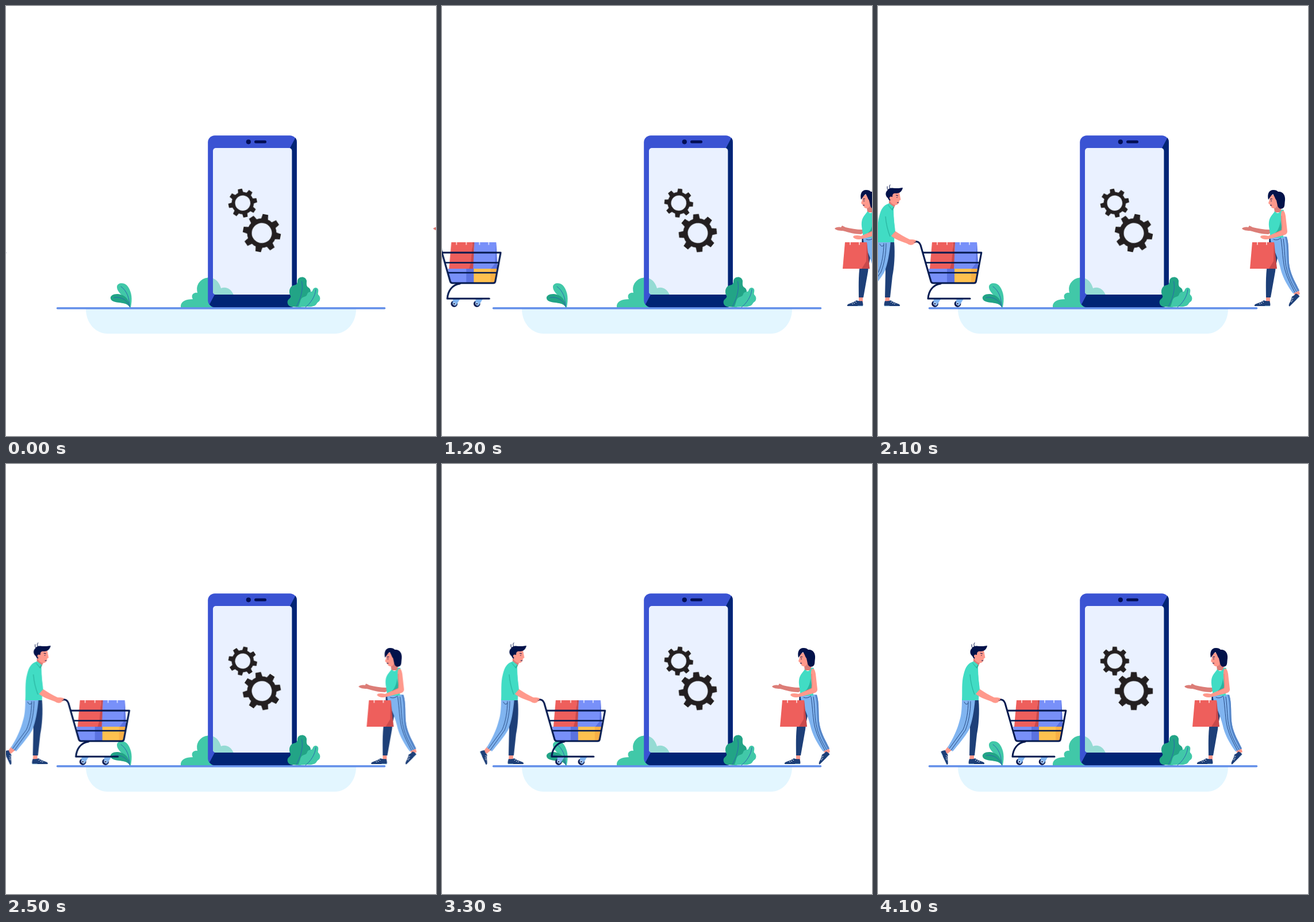
These frames come from a looping animation (748 by 748 pixels, 4200 ms). An HTML page:

```html
<!DOCTYPE html>
<html lang="en">
<head>
<meta charset="utf-8">
<title>Mobile shopping</title>
<style>
  html, body { margin: 0; width: 100%; height: 100%; overflow: hidden; background: #fff; }
  svg { display: block; width: 100vw; height: 100vh; }

  .navy { fill: #02124a; }
  .denim { fill: #1d3f78; }
  .jean { fill: #80b4f0; }
  .skin { fill: #ff998c; }
  .skin2 { fill: #dc7d77; }
  .mint { fill: #41dcc4; }
  .mint2 { fill: #29b39f; }
  .red { fill: #ee5f5c; }
  .red2 { fill: #c9494b; }
  .blue { fill: #7890f9; }
  .blue2 { fill: #5b72e0; }
  .gold { fill: #fec14f; }
  .gold2 { fill: #f9b045; }
  .leaf { fill: #41c8a8; }
  .leaf2 { fill: #22a486; }
  .line { fill: none; stroke: #1d3f78; stroke-width: .9; stroke-linecap: round; }
  .vein { fill: none; stroke: #2b67ad; stroke-width: 1; stroke-linecap: round; }
  .rail { fill: none; stroke: #02194f; stroke-width: 3; stroke-linecap: round; stroke-linejoin: round; }
  .thin { stroke-width: 2.3; }
  .tie { fill: none; stroke: #fff; stroke-width: 1.3; stroke-linecap: round; }
  .ink { fill: none; stroke: #02124a; stroke-width: 1; }

  /* Ten poses a second; the tiny negative delay keeps each step off its boundary. */
  .man { animation: man 4200ms -4ms infinite; }
  .woman { animation: woman 4200ms -4ms infinite; }
  .gear { animation: turn 700ms -4ms steps(7) infinite; }

  @keyframes man {
    0% { transform: translateX(-328.5px); animation-timing-function: steps(38); }
    90.476%, 100% { transform: none; }
  }
  @keyframes woman {
    0% { transform: translateX(210px); animation-timing-function: steps(7); }
    16.667% { transform: translateX(170px); animation-timing-function: steps(5); }
    28.571% { transform: translateX(150px); animation-timing-function: steps(9); }
    50% { transform: translateX(100px); animation-timing-function: steps(12); }
    78.571% { transform: translateX(41px); animation-timing-function: steps(3); }
    85.714% { transform: translateX(7px); animation-timing-function: steps(2); }
    90.476%, 100% { transform: translateX(0); }
  }
  /* An eighth of a tooth per step, with a hard wrap after seven steps. */
  @keyframes turn {
    from { transform: rotate(11.25deg); }
    to { transform: rotate(50.625deg); }
  }
</style>
</head>
<body>
<svg viewBox="0 0 748 748">
  <defs>
    <path id="bush" d="M304 524C303 515 311 510 325 510C321 503 326 498 333 499C329 484 340 472.500 353 472.500C365 473 371 481 374 491C384 487 393 494 396 503V524Z"/>
    <clipPath id="glass"><rect x="360" y="247" width="137.400" height="255" rx="5"/></clipPath>

    <path id="tooth" d="M-6-24L-4.8-33H4.8L6-24Z"/>
    <g id="pair"><use href="#tooth"/><use href="#tooth" transform="rotate(45)"/></g>
    <g id="half"><use href="#pair"/><use href="#pair" transform="rotate(90)"/></g>
    <g id="cog" fill="#231f20">
      <use href="#half"/><use href="#half" transform="rotate(180)"/>
      <circle r="21.5" fill="none" stroke="#231f20" stroke-width="8"/>
    </g>

    <g id="shoe">
      <path class="denim" d="M0 0Q5 1 10-1C15 3 22 4 25 6C27 8 26 9 25 9H-1C-2 6-1 3 0 0Z"/>
      <path d="M12 1l-2 2M15 3l-2 2M18 4l-2 2" stroke="#fff" stroke-width=".9"/>
      <path d="M-1 9H8" stroke="#bde6f7" stroke-width="1"/>
    </g>
    <g id="wheel">
      <circle class="navy" r="5.8"/>
      <path class="jean" d="M-2-8H10L3 3C0 4.500-3 2-3-1Z"/>
      <circle r="2.3" fill="#e4f0fd"/>
      <circle class="navy" r="1.3"/>
    </g>
  </defs>

  <!-- ground -->
  <path fill="#e3f6ff" d="M139 527H609C609 552 592 570 572 570H177C156 570 139 552 139 527Z"/>
  <path d="M89.5 525.7H658.5" stroke="#638fe9" stroke-width="3.5" stroke-linecap="round"/>

  <!-- phone -->
  <use href="#bush" class="leaf"/>
  <rect x="351.2" y="225.2" width="154.600" height="298.800" rx="12" fill="#3a53d3"/>
  <path fill="#012475" d="M503.500 229L494 247V502H363L354 519C356 522 359 524 363 524H494Q505.800 524 505.800 512V237Q505.800 232 503.500 229Z"/>
  <rect x="360" y="247" width="137.400" height="255" rx="5" fill="#eaf1ff"/>
  <use href="#bush" fill="#95dbd4" clip-path="url(#glass)"/>
  <circle cx="421.8" cy="236.3" r="4.1" fill="#020f56"/>
  <path d="M434.5 236.3H450.5" stroke="#020f56" stroke-width="5" stroke-linecap="round"/>

  <g transform="translate(445 395)"><g class="gear"><use href="#cog"/></g></g>
  <g transform="translate(411.8 342.8) scale(-.757 .757)"><g class="gear"><use href="#cog"/></g></g>

  <!-- plants -->
  <path class="leaf" d="M216 524C214 508 192 501 193 488C194 481 206 480 212 488C219 498 220 510 217 524Z"/>
  <path class="leaf2" d="M215 524C210 514 194 518 185 513C178 508 183 500 195 501C207 502 215 511 216 524Z"/>
  <path class="vein" d="M200 488C210 495 215 508 215 523M188 507C202 505 211 513 215 522"/>
  <path class="leaf2" d="M496 523C490 522 488 515 491 511C494 508 496 507 495 504C491 498 493 488 500 486C505 485 506 484 507 480C506 470 521 468 523 478C523 483 522 486 525 489C531 492 531 498 528 502C526 506 527 508 524 511L512 524Z"/>
  <path class="leaf" d="M508 524C512 518 511 510 516 507C521 505 523 505 524 501C526 496 530 498 533 496C534 489 541 488 543 493C544 497 542 499 543 502C548 506 547 513 543 515C540 517 540 521 535 522C530 524 527 523 524 523Z"/>
  <path class="vein" d="M514.5 479C518 495 511 512 505 523M539 493C538 505 530 517 521 524"/>

  <!-- man with cart -->
  <g class="man">
    <path class="skin" d="M160 503H167V516H159Z"/>
    <path class="denim" d="M157 410H175C177 432 175 456 172 470L168 507H159L160 462Z"/>
    <use href="#shoe" transform="translate(159 513)"/>
    <path class="skin" d="M122 491L129 497 121 504 115 500Z"/>
    <path class="jean" d="M146 409C146 425 145 437 142 446C138 462 130 479 121 493L130 500C140 488 151 475 158 463C164 449 167 430 169 409Z"/>
    <path class="line" d="M157 413C157 430 154 448 148 462L124 495M161 413C161 430 158 448 152 463L127 498M150 414Q153 421 157 416"/>
    <use href="#shoe" transform="translate(117 498) rotate(65) scale(.92)"/>

    <path class="skin2" d="M166 338L178 344 174 353 166 350Z"/>
    <path class="skin" d="M168 323L184 324 186.500 337 184 338.500C184 343 181 347 176 346C170 345 167 340 166 333Z"/>
    <path class="navy" d="M164 334C160 331 159 325 163 321C166 316 171 316 176 317C181 317 185 317 190 316C189 322 185 326 178 326C174 325 172 327 172 332L169 333L168 339C166 338 165 336 164 334Z"/>
    <path class="ink" d="M165 321Q162 318 163 314M169 319Q165 315 168 311" stroke-linecap="round"/>
    <circle class="skin" cx="169.5" cy="334" r="2.6"/>
    <path class="ink" d="M178 329L182 330M180 332V333.500M180 342H183"/>

    <path class="mint" d="M165 344L174 352C174 362 175 378 176 390L175 411H146C147 397 145 380 149 366C152 353 157 346 165 344Z"/>
    <path class="mint2" d="M166 344L175 350 172 356 164 346Z"/>
    <path class="mint" d="M166 343L174 349 171 353 164 345Z"/>
    <path class="skin" d="M167 390L176 391C185 397 193 402 202 406L212 407C215 409 214 412 210 413C207 417 201 416 197 413C186 409 175 405 170 400Z"/>
    <path class="mint" d="M160 362C167 354 173 358 174 366L177 392 168 402C162 387 160 372 160 362Z"/>
    <path d="M160 366C161 379 164 391 168 401" fill="none" stroke="#29b39f" stroke-width="1.2"/>

    <path class="red" d="M241 411H278L275 457H237Z"/>
    <path class="red2" d="M278 411H281L280 457H272L275 446Z"/>
    <path class="blue" d="M281 411H319L321 457H279Z"/>
    <path class="blue2" d="M319 411L321.500 457H310L317 448Z"/>
    <path class="blue" d="M235 457H267V482H240Z"/>
    <path class="blue2" d="M267 457H280V482H267Z"/>
    <path class="gold" d="M280 457H309V482H280Z"/>
    <path class="gold2" d="M309 457H320L317 482H309Z"/>
    <path class="tie" d="M250 411V415M267 411V415M290 411V415M306 411V415"/>

    <use href="#wheel" transform="translate(246 518)"/>
    <use href="#wheel" transform="translate(285.5 518)"/>
    <path class="rail" d="M211 410C216 409 219 411 221 416L239 479Q240 482 243 482H314Q317 482 317.500 479L326.800 429H226M256 483C242 485 235 496 234 509H307"/>
    <path class="rail thin" d="M231 446.500H323M236 464H320"/>
    <path class="skin" d="M202 407Q208 405 213 408L212 411Q207 409 203 412Z"/>
  </g>

  <!-- woman with bag -->
  <g class="woman">
    <path class="skin2" d="M584 384L581 389C571 389 561 387 552 385L546 382 544 385C539 384 535 385 533 387C535 390 541 391 547 391C558 394 569 397 579 397L586 393Z"/>
    <path class="skin" d="M575 503H582V516H575Z"/>
    <path class="denim" d="M581 404H600C599 424 593 442 591 462L583 507H575C575 490 574 472 577 450Z"/>
    <use href="#shoe" transform="translate(581 513) scale(-1 1)"/>
    <path class="skin" d="M621 496L631 491 634 501 626 505Z"/>
    <path class="jean" d="M582 401H611C616 416 613 438 616 454C619 470 627 482 633 495L622 500C613 488 605 474 601 460C597 442 591 428 584 413Z"/>
    <path d="M611 402C616 416 613 438 616 454C619 470 627 482 633 495L630 496.500C623 483 616 470 613 456C610 436 613 418 608 402Z" fill="#5686c8"/>
    <path class="line" d="M588 406Q595 409 601 403M601 405C604 424 604 444 608 459C612 474 619 486 625 498M605 405C608 424 607 444 611 458C614 472 621 485 628 497"/>
    <use href="#shoe" transform="translate(627 500) scale(-.92 .92) rotate(45)"/>

    <path class="skin2" d="M588 343L600 345 602 359 590 359Z"/>
    <path class="skin" d="M582 328L594 329C597 335 596 345 593 350C589 354 584 352 582 346L579 343 581 337Z"/>
    <path class="navy" d="M579 337C577 328 579 320 588 320C592 320 594 321 596 323C604 322 609 329 608 338C607 345 608 350 604 352C600 354 596 352 595 347L593 338C591 336 590 331 587 327C584 329 582 333 579 337Z"/>
    <path class="ink" d="M582 336L586 335.500M584 338V340M582 346.500H585"/>

    <path class="mint" d="M590 357C594 362 599 361 602 354L606 355C605 368 604 386 605 403H582C583 393 579 386 580 376C581 366 587 363 590 357Z"/>
    <path class="mint2" d="M600 373C599 383 596 391 589 397L603 392Z"/>

    <path d="M560 414C560 406 566 401 578 401M577 413V403" fill="none" stroke="#fff" stroke-width="1.5"/>
    <path class="ink" d="M581 404V411"/>
    <path class="red" d="M551 411H589L592 457H547Z"/>
    <path class="red2" d="M589 411L594 457H580L588 444Z"/>
    <path class="tie" d="M560 410V415M576 410V415"/>

    <path class="skin" d="M602 357C606 354 608 359 609 365L612 392C612 396 609 398 605 399L581 405C575 407 568 406 565 402C566 398 573 399 579 400L602 390C603 378 599 367 602 357Z"/>
    <path d="M602 365C602 373 603 382 602 390L591 395" fill="none" stroke="#dc7d77" stroke-width="1"/>
  </g>
</svg>
</body>
</html>
```
